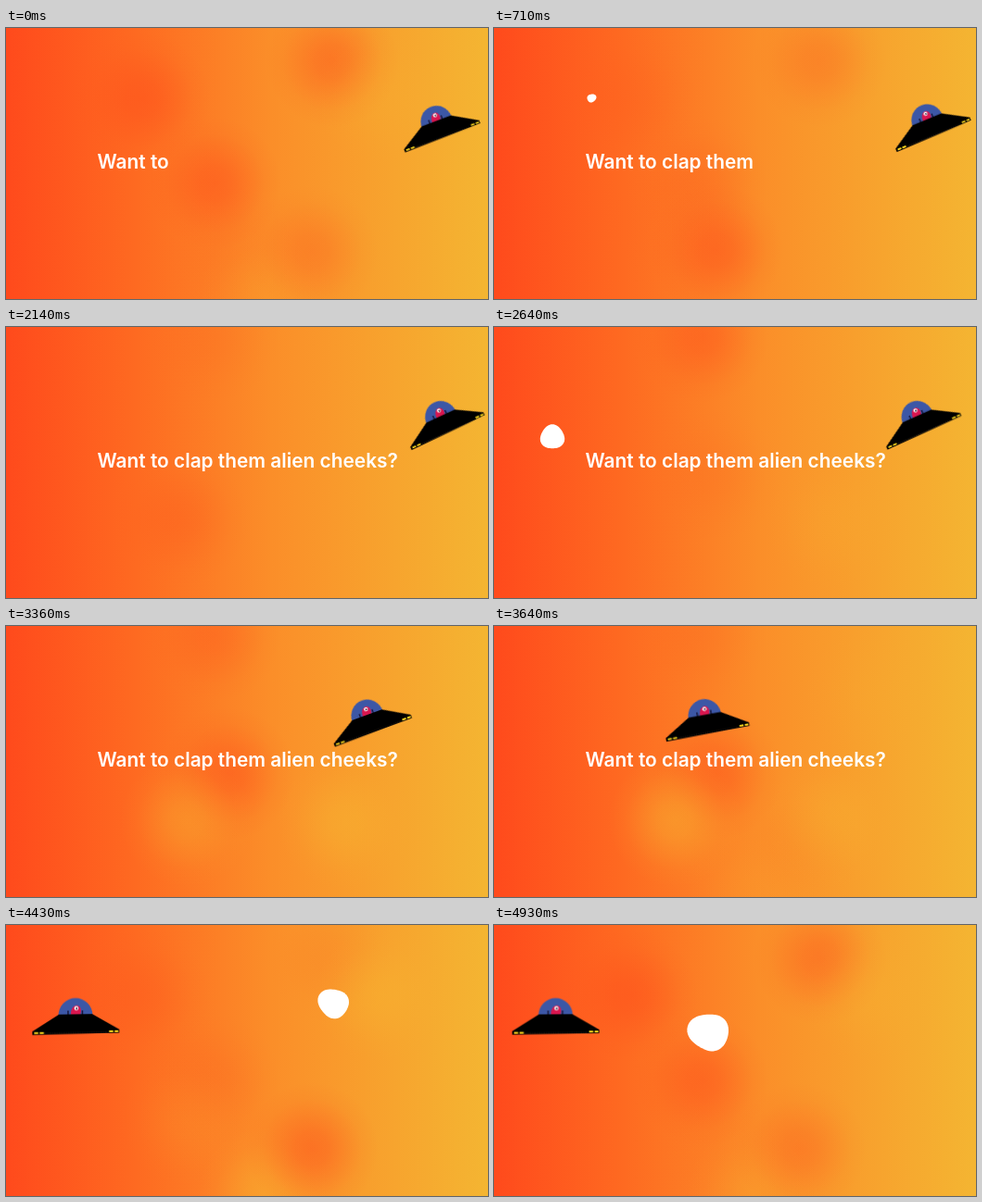
An HTML page with a canvas that plays this animation: 520x293 px, repeating every 5 s.

```html
<!DOCTYPE html>
<html lang="en">
<head>
<meta charset="utf-8">
<title>Alien cheeks</title>
<style>
  html, body { margin: 0; width: 100%; height: 100%; overflow: hidden; background: #fb8a28; }
  canvas, svg { position: absolute; inset: 0; width: 100%; height: 100%; display: block; }
  text { font: 600 20.85px Inter, sans-serif; fill: #fff; white-space: pre; }
  /* the clock sets --t, so the flight holds each step */
  #ufo { animation: fly 5s calc(var(--t, 0) * -1ms) infinite paused; }
  @keyframes fly {
    0% {
      transform: translate(471px, 118.5px) rotate(-20.7deg) scale(.925);
      animation-timing-function: linear;
    }
    34.6% {
      transform: translate(479.5px, 114px) rotate(-25deg) scale(.93);
      animation-timing-function: cubic-bezier(1, 0, .2, 1);
    }
    100% { transform: translate(66.5px, 117.5px) rotate(-.4deg) scale(1); }
  }
</style>
</head>
<body>
<canvas id="sky" width="520" height="293"></canvas>
<svg viewBox="0 0 520 293" preserveAspectRatio="none">
  <text id="line" x="98.5" y="152"></text>
  <g id="ufo">
    <path d="M-18.5-19.5a18.5 19 0 0 1 37 0z" fill="#3c57a6"/>
    <path d="M-8-19v-6M7.5-19v-6" stroke="#16143a" stroke-width="1.5"/>
    <path d="M-5-19.5c-1-13 11-14 11-5l-1 5z" fill="#d9164f"/>
    <circle cx="1" cy="-27.5" r="2.3" fill="#fff"/>
    <circle cx="1.3" cy="-27.2" r="1" fill="#301030"/>
    <path d="M-18-21H18L47-4V-.2L-47 .8V-3z"/>
    <path d="M-33-.9H34" stroke="#3a3228" stroke-width=".8" stroke-dasharray="1 1.5"/>
    <path d="M-45-1.3h4.500m1.500 0h4.500M36-1.900h4.500m1.500 0h4" stroke="#f5d21c" stroke-width="2"/>
  </g>
  <path id="blob" fill="#fff"/>
</svg>
<script>
const LOOP = 5000, STEP = LOOP / 70;
const RED = '255,78,28', GOLD = '247,178,48';
const $ = id => document.getElementById(id);
const ctx = $('sky').getContext('2d');

// white pops: x, y, radius, peak time, pointedness
const pops = [
  [105, 76, 6, 800, .5], [63, 119, 13, 2640, 0], [230, 109.5, 20, 3930, 1],
  [354, 85, 18, 4370, .3], [394, 187, 18, 4700, .3], [233, 116, 21, 4930, .4]
];

// background glows: x, y, peak time, colour
const glows = [
  [148, 76, 0, RED], [225, 168, 100, RED], [352, 36, 200, RED],
  [240, 240, 800, RED], [190, 208, 1600, RED], [225, 10, 2900, RED],
  [240, 160, 3400, RED], [365, 212, 3300, GOLD], [195, 210, 3700, GOLD],
  [405, 75, 4400, GOLD], [280, 290, 4400, GOLD], [330, 242, 4500, RED]
];

const smooth = p => p * p * (3 - 2 * p);

const base = ctx.createLinearGradient(0, 0, 520, 0);
[[0, '#ff4a1c'], [.27, '#fe6a21'], [.55, '#fb8e29'], [1, '#f4b532']]
  .forEach(stop => base.addColorStop(...stop));

function drawGlow(t, [x, y, peak, rgb]) {
  const gap = Math.abs(t - peak);
  const near = 1 - Math.min(gap, LOOP - gap) / 1100;
  if (near <= 0) return;
  const r = 72, g = ctx.createRadialGradient(x, y, 0, x, y, r);
  for (let k = 0; k <= 1; k += .25) {
    g.addColorStop(k, `rgba(${rgb},${.5 * smooth(near) * (1 - smooth(k))})`);
  }
  ctx.fillStyle = g;
  ctx.fillRect(x - r, y - r, 2 * r, 2 * r);
}

function drawSky(t) {
  ctx.fillStyle = base;
  ctx.fillRect(0, 0, 520, 293);
  glows.forEach(glow => drawGlow(t, glow));
}

// a round shape that swells and shrinks, its tip slowly turning
function popPath(t, [x, y, r, peak, point]) {
  const size = r * Math.cos((t - peak) / 400 * Math.PI);
  if (Math.abs(t - peak) >= 200) return '';
  const turn = -Math.PI / 2 - (t - 2640) * .00058;
  const pts = Array.from({ length: 60 }, (_, k) => {
    const u = k * Math.PI / 30;
    const d = size * (1 + .16 * point * (Math.cos(u) + Math.cos(2 * u)) + .06 * Math.cos(3 * u));
    return (x + d * Math.cos(u + turn)).toFixed(2) + ' ' + (y + d * Math.sin(u + turn)).toFixed(2);
  });
  return 'M' + pts.join('L') + 'Z';
}

const words = 'Want to clap them alien cheeks?'.split(' ');

function render(t) {
  drawSky(t);
  const shown = t < 3780 ? 2 + Math.floor((t + 220) / 460) : 0;
  $('line').textContent = words.slice(0, shown).join(' ');
  $('ufo').style.setProperty('--t', t);
  $('blob').setAttribute('d', pops.map(pop => popPath(t, pop)).join(''));
}

const began = performance.now();
function tick() {
  const t = (performance.now() - began) % LOOP;
  render(Math.floor((t + 5) / STEP) * STEP % LOOP);
  requestAnimationFrame(tick);
}
tick();
</script>
</body>
</html>
```
